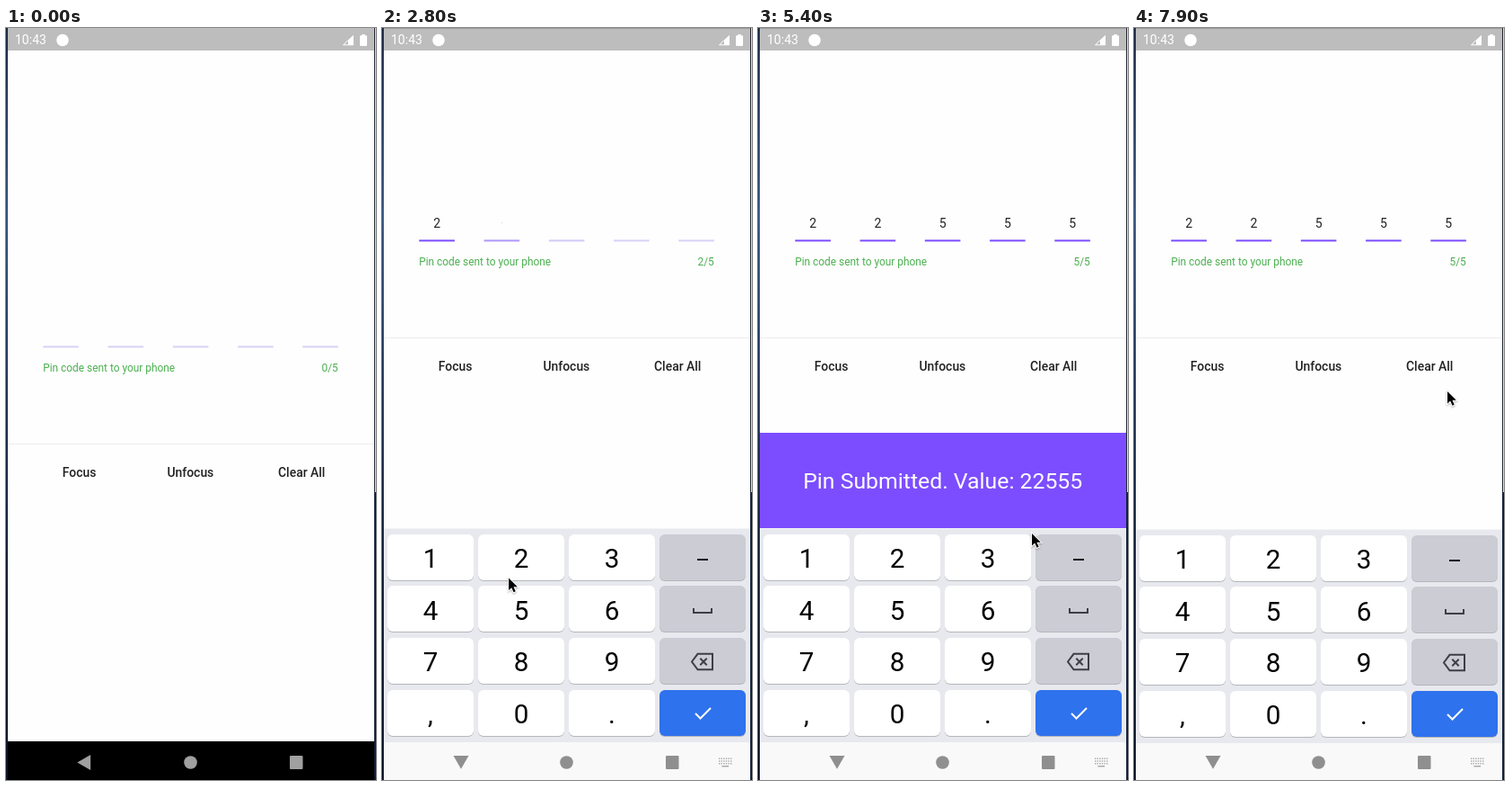
Recreate the animation shown at these times as an HTML page with a canvas. Size 412 by 836 pixels, loop 8 s.

```html
<!DOCTYPE html>
<html lang="en">
<head>
<meta charset="utf-8">
<title>Pin entry</title>
<style>
  html, body { margin: 0; width: 100%; height: 100%; overflow: hidden; background: #fff; }
  canvas { display: block; width: 412px; height: 836px; }
</style>
</head>
<body>
<canvas id="stage"></canvas>
<script>
const W = 412, H = 836, LOOP = 8000;
const canvas = document.getElementById('stage');
const dpr = window.devicePixelRatio || 1;
canvas.width = W * dpr;
canvas.height = H * dpr;
const c = canvas.getContext('2d');

const PURPLE = [124, 77, 255], SELECTED = [187, 166, 248], IDLE = [216, 209, 246];
const INK = '#212121', GREEN = '#4caf50';
const NAV_Y = 793, BOARD_Y = 557;

// Moments of the story, in ms
const SHOW = 1350, HIDE = 5830, REOPEN = 7590;
const PIN = '22555', TYPED_AT = [2300, 2770, 3220, 3450, 3700];
const SNACK_IN = 3720, SNACK_OUT = 6960, SNACK_MS = 250;
const FADE = 180, GLIDE = 400;

// The pointer rests at each stop and glides to the next: arrival, x, y
const OUTSIDE = { x: 420, y: 708 };
const STOPS = [
  { at: 1300, x: 82, y: 497 },
  { at: 1850, x: 142, y: 610 },
  { at: 3150, x: 121, y: 645 },
  { at: 4900, x: 350, y: 762 },
  { at: 5400, x: 305, y: 562 },
  { at: 5800, x: 214, y: 380 },
  { at: 6384, ...OUTSIDE },
  { at: 7300, x: 350, y: 345 },
  { at: 7900, x: 349, y: 404 }
];

const clamp = x => Math.max(0, Math.min(1, x));
const ramp = (t, start, ms) => clamp((t - start) / ms);
const easeOut = x => 1 - (1 - x) ** 3;
const smooth = x => x * x * (3 - 2 * x);
const lerp = (a, b, p) => a + (b - a) * p;
const mix = (a, b, p) => a.map((v, i) => lerp(v, b[i], p));
const rgb = v => `rgb(${v.map(Math.round).join()})`;
const isOpen = t => (t >= SHOW && t < HIDE) || t >= REOPEN;
const typedCount = t => TYPED_AT.filter(at => t >= at).length;

function rect(x, y, w, h, fill) {
  c.fillStyle = fill;
  c.fillRect(x, y, w, h);
}

function round(x, y, w, h, r, fill) {
  c.fillStyle = fill;
  c.beginPath();
  c.roundRect(x, y, w, h, r);
  c.fill();
}

function text(str, x, y, size, fill, align = 'left', weight = 400) {
  c.font = `${weight} ${size}px Roboto, sans-serif`;
  c.textAlign = align;
  c.fillStyle = fill;
  c.fillText(str, x, y);
}

const path = (x, y, d) => {
  const moved = new Path2D();
  moved.addPath(new Path2D(d), new DOMMatrix().translate(x, y));
  return moved;
};

function fill(shape, color) {
  c.fillStyle = color;
  c.fill(shape);
}

function stroke(shape, color, width = 2) {
  c.strokeStyle = color;
  c.lineWidth = width;
  c.stroke(shape);
}

function disc(x, y, r, color) {
  c.fillStyle = color;
  c.beginPath();
  c.arc(x, y, r, 0, Math.PI * 2);
  c.fill();
}

function triangle(x, y, r, angle, color) {
  c.fillStyle = color;
  c.beginPath();
  for (let i = 0; i < 3; i++) {
    const a = angle + i * Math.PI * 2 / 3;
    c.lineTo(x + r * Math.cos(a), y + r * Math.sin(a));
  }
  c.fill();
}

function statusBar(t) {
  rect(0, 0, W, 25, '#bdbdbd');
  if (t >= 500) rect(0, 0, W, 1, '#9a9a9a');
  text('10:43', 10, 18, 14, '#fff');
  disc(63, 13.5, 6.8, '#fff');
  stroke(path(375.5, 18.8, 'M0 0h11v-10z'), '#fff', 1);
  fill(path(381, 19, 'M0 0v-5.5l6-5.5v11z'), '#fff');
  round(394, 8.2, 8, 11.8, 1, '#fff');
  rect(396.3, 7, 3.4, 2, '#fff');
}

function cellState(i, t) {
  if (!isOpen(t)) return IDLE;
  const count = typedCount(t);
  return i < count ? PURPLE : i === count ? SELECTED : IDLE;
}

// Every change of state fades the underline from its former colour
function cellColor(i, t) {
  const last = Math.max(0, ...[SHOW, HIDE, REOPEN, ...TYPED_AT].filter(at => at <= t));
  return rgb(mix(cellState(i, last - 1), cellState(i, t), ramp(t, last, FADE)));
}

function content(t) {
  c.save();
  c.translate(0, isOpen(t) ? (BOARD_Y - NAV_Y) / 2 : 0);
  [...PIN].forEach((digit, i) => {
    const mid = 61.1 + i * 72.25;
    rect(mid - 19.8, 353.4, 39.6, 2, cellColor(i, t));
    const size = smooth(ramp(t, TYPED_AT[i], FADE));
    if (!size) return;
    c.save();
    c.translate(mid, 335);
    c.scale(size, size);
    text(digit, 0, 5, 14, INK, 'center');
    c.restore();
  });
  text('Pin code sent to your phone', 41.2, 382, 11.9, GREEN);
  text(`${typedCount(t)}/${PIN.length}`, 369.8, 382, 11.9, GREEN, 'right');
  rect(2, 462, 408, 1, '#ececec');
  ['Focus', 'Unfocus', 'Clear All'].forEach((label, i) =>
    text(label, 81.6 + i * 123.8, 499, 13.9, INK, 'center', 500));
  c.restore();
}

function snackBar(t) {
  const grow = easeOut(ramp(t, SNACK_IN, SNACK_MS)) - ramp(t, SNACK_OUT, SNACK_MS) ** 2;
  if (grow <= 0) return;
  const bottom = isOpen(t) ? BOARD_Y : NAV_Y;
  const top = bottom - 107 * grow;
  c.save();
  c.beginPath();
  c.rect(2, top, 408, bottom - top);
  c.clip();
  rect(2, top, 408, 107, rgb(PURPLE));
  c.globalAlpha = smooth(grow);
  text(`Pin Submitted. Value: ${PIN}`, 205.7, top + 62, 24.8, '#fff', 'center');
  c.restore();
}

function navIcons(withBoard) {
  const color = withBoard ? '#8f8f8f' : '#a0a0a0';
  if (withBoard) triangle(88, 814, 9.8, Math.PI / 2, color);
  else triangle(89.2, 816.5, 9.8, Math.PI, color);
  disc(205.5, 816.5, 7.3, color);
  round(316, 809, 14.5, 15, 1, color);
  if (!withBoard) return;
  for (let i = 0; i < 18; i++)
    rect(375 + i % 6 * 2.6, 811.5 + Math.floor(i / 6) * 2.8, 1.4, 1.4, '#a4a4a4');
  rect(378.5, 820, 7.5, 1.4, '#a4a4a4');
}

function key(col, row, color) {
  const x = 6 + col * 101, y = Math.round(562.6 + row * 57.7);
  round(x, y + 1, 96, 51, 6, '#b5b6bb');
  round(x, y, 96, 51, 6, color);
}

function keyGlyphs() {
  const ink = '#3d3f45';
  rect(351, 590, 12, 2, '#111');
  stroke(path(347, 645, 'M0 0v5h20v-5'), ink);
  stroke(path(345, 704.5, 'M0 0l6.5-8.7h16.5v17.5h-16.5zM9.3-3.7l7.4 7.4m0-7.4l-7.4 7.4'), ink);
  stroke(path(349, 762, 'M0 0l5.5 5.5l11.5-11.5'), '#fff');
}

function keyboard(t) {
  const start = t >= REOPEN ? REOPEN : SHOW;
  const leave = t >= REOPEN ? 0 : ramp(t, HIDE, FADE);
  if (t < start || leave === 1) return;
  const enter = ramp(t, start, 450);
  const pressed = [...PIN].find((_, i) => t >= TYPED_AT[i] - 100 && t < TYPED_AT[i]);
  c.save();
  c.globalAlpha = clamp(enter * 4) * (1 - leave);
  c.save();
  c.translate(0, Math.floor(40 * (1 - easeOut(enter)) + 60 * leave ** 2));
  rect(2, BOARD_Y - 1, 408, 1, '#f4f4f6');
  rect(2, BOARD_Y, 408, 237, '#e8e9ee');
  rect(2, BOARD_Y + 237, 408, 60, '#f9f9fa');
  ['123–', '456␣', '789⌫', ',0.✓'].forEach((chars, row) => [...chars].forEach((ch, col) => {
    if (col === 3) return key(col, row, ch === '✓' ? '#2f72ed' : '#cbccd4');
    key(col, row, ch === pressed ? '#dcdde2' : '#fff');
    text(ch, 54 + col * 101, Math.round(600.2 + row * 57.6), 29.6, '#000', 'center');
  }));
  keyGlyphs();
  c.restore();
  navIcons(true);
  c.restore();
}

function edges() {
  const side = c.createLinearGradient(0, 0, 0, H);
  ['#1a2942', '#35527f', '#1d3150', '#101c30', '#0b1424']
    .forEach((color, i) => side.addColorStop(i / 4, color));
  rect(0, 0, 2, H, side);
  rect(410, 0, 1, 516, '#20242c');
  rect(411, 0, 1, 516, '#e4e5e8');
  rect(410, 516, 2, 320, '#10203a');
}

function pointer(t) {
  let pos = OUTSIDE;
  for (const stop of STOPS) {
    const p = smooth(ramp(t, stop.at - GLIDE, GLIDE));
    pos = { x: lerp(pos.x, stop.x, p), y: lerp(pos.y, stop.y, p) };
  }
  if (pos.x >= W) return;
  const arrow = path(pos.x, pos.y, 'M0 0v13.5l3.2-2.9l2.3 5.2l2.2-1l-2.3-5.1h4.4z');
  c.save();
  c.shadowColor = 'rgba(0,0,0,.3)';
  c.shadowBlur = 2 * dpr;
  c.shadowOffsetY = dpr;
  stroke(arrow, '#fff');
  c.restore();
  fill(arrow, '#000');
}

function draw(t) {
  c.setTransform(dpr, 0, 0, dpr, 0, 0);
  rect(0, 0, W, H, '#fefefe');
  content(t);
  statusBar(t);
  snackBar(t);
  rect(0, NAV_Y, W, H - NAV_Y, '#000');
  if (t >= HIDE && t < 6400) rect(0, 831, W, 5, '#a9a9a9');
  navIcons(false);
  keyboard(t);
  edges();
  pointer(t);
}

const begin = performance.now();
function tick() {
  draw((performance.now() - begin) % LOOP);
  requestAnimationFrame(tick);
}
tick();
</script>
</body>
</html>
```
